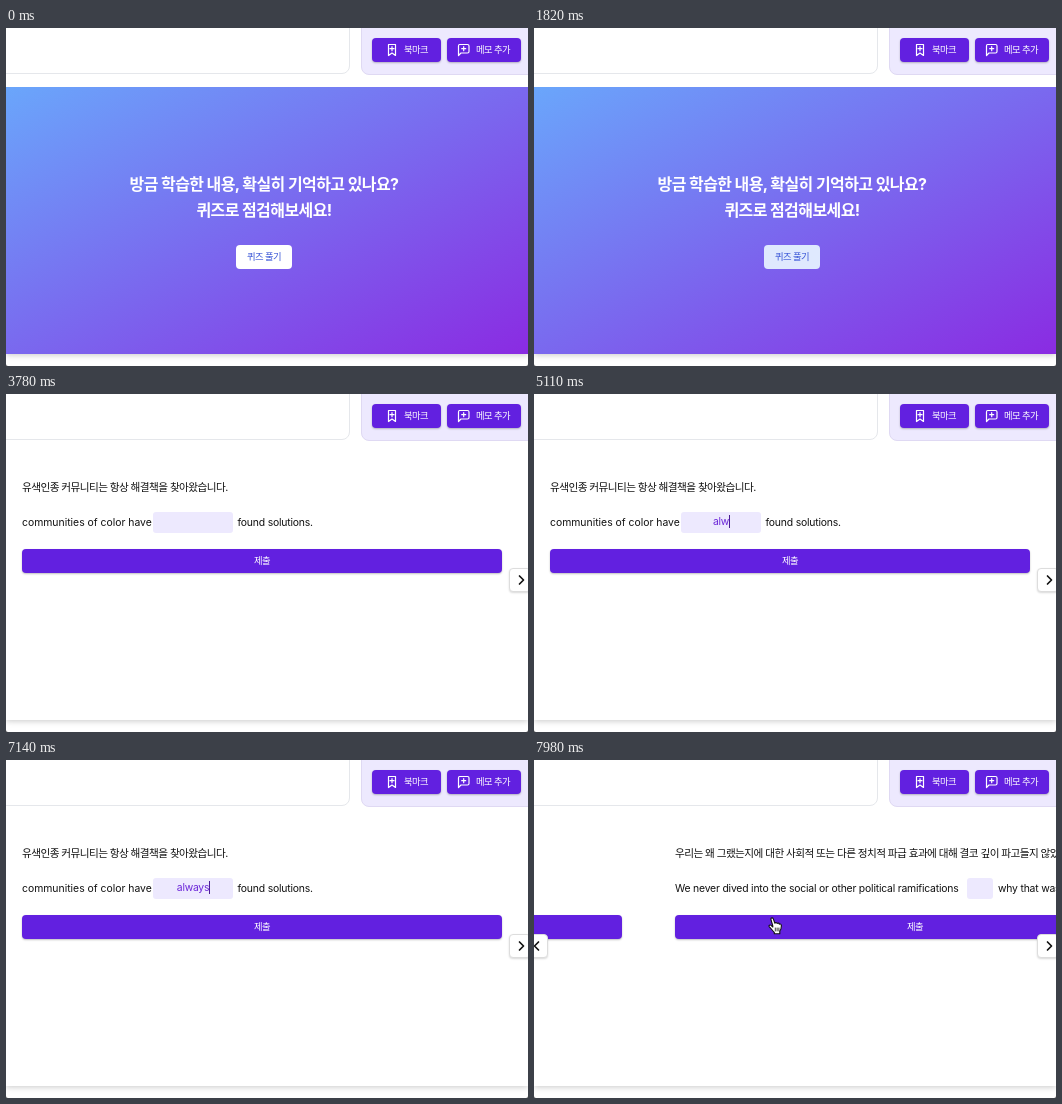
Recreate the animation shown at these times as an HTML page. Size 522 px wide and 338 px high, loop 8 s.

```html
<!DOCTYPE html>
<html lang="ko">
<head>
<meta charset="utf-8">
<title>Quiz</title>
<style>
  :root { --violet: #6220e0; --lilac: #ede9fe; }
  html, body { margin: 0; width: 100%; height: 100%; overflow: hidden; background: #555; }
  body {
    font: 10.67px/21px Inter, "Noto Sans CJK KR", "Noto Sans CJK", sans-serif;
    letter-spacing: -.055em; white-space: nowrap; color: #111;
  }
  body *, .answer::before { box-sizing: border-box; }
  svg { position: absolute; fill: none; overflow: visible; stroke-linecap: round; stroke-linejoin: round; }
  div, span { position: absolute; }

  .stage { left: 0; top: 0; width: 522px; height: 338px; overflow: hidden; background: #fff; border-radius: 0 0 2px 2px; }
  .card { left: 0; top: 0; width: 522px; height: 326px; background: #fff; box-shadow: 0 1px 6px rgba(0, 0, 0, .22); }
  .view { left: 0; top: 59px; width: 522px; height: 267px; overflow: hidden; }

  .panel { height: 60px; border: 1px solid #e5e7eb; border-radius: 8px; background: #fff; }
  .notes { left: -20px; top: -14px; width: 364px; }
  .tools { left: 355px; top: -13px; width: 190px; background: var(--lilac); border-color: #dfd9f3; }

  .btn {
    height: 24px; border-radius: 4px; background: var(--violet); color: #fff;
    font-size: 9.33px; font-weight: 500; line-height: 24px; text-align: center;
    box-shadow: 0 1px 2px rgba(0, 0, 0, .25);
  }
  .btn span { left: 32px; }
  .btn svg { left: 14px; top: 5px; stroke: #fff; stroke-width: 1.2; }

  .banner { inset: 0; background: linear-gradient(to bottom right, #6aa6fb, #8a2be2); }
  .banner p {
    position: absolute; left: 0; top: 84px; width: 516px; margin: 0;
    color: #fff; font-size: 16px; font-weight: 700; line-height: 26px; text-align: center;
  }
  .start { left: 230px; top: 158px; width: 56px; background: #fff; color: #3653d6; box-shadow: none; }

  .track { inset: 0; }
  .slide { left: 16px; top: 0; width: 480px; height: 267px; }
  .next { left: 549px; }
  .ko { left: 0; top: 24px; }
  .en { top: 59px; font-size: 10.4px; letter-spacing: -.2px; }
  .blank { top: 59px; height: 21px; border-radius: 3px; background: var(--lilac); }
  .submit { left: 0; top: 96px; width: 480px; }

  .answer {
    left: 131px; width: 80px; color: #6d28d9; font-size: 10.4px;
    line-height: 20px; letter-spacing: -.25px; text-align: center;
  }
  .answer::before { content: ""; }
  .caret { position: relative; display: inline-block; width: 1px; height: 13px; margin-right: -1px; vertical-align: -3px; background: #4c1d95; }
  .result { left: 0; top: 128px; color: #43a047; font-weight: 700; }
  .result span { left: 19px; }
  .result svg { left: 0; top: 3px; stroke: #43a047; stroke-width: 1.4; }

  .nav { top: 174px; width: 22px; height: 24px; border: 1px solid #ddd; border-radius: 4px; background: #fff; box-shadow: 0 1px 2px rgba(0, 0, 0, .15); }
  .nav svg { top: 6px; stroke: #111; stroke-width: 1.7; }
  .fwd { left: 503px; }
  .fwd svg { left: 9px; }
  .back { left: -8px; }
  .back svg { left: 7px; }
  .ibeam { left: 190px; top: 116px; stroke: #111; }
  .hand { left: 234px; top: 157px; fill: #fff; stroke: #111; stroke-width: 1.1; }

  /* every change is a hard cut on one 8 s clock */
  .start, .banner, .track, .caret, .result, .back, .ibeam, .hand, .answer::before { animation: 8s step-end infinite; }
  .start { animation-name: hover; }
  .banner { animation-name: leave; }
  .track { animation-name: scroll; }
  .answer::before { animation-name: type; }
  .caret { animation-name: blink; }
  .result { animation-name: correct; }
  .back { animation-name: reveal; }
  .ibeam { animation-name: aim; }
  .hand { animation-name: press; }

  @keyframes hover {
    0% { background: #fff; }
    21% { background: #f4f8ff; }
    21.875% { background: #e9f0fe; }
    22.75%, 100% { background: #dfe9fe; }
  }
  @keyframes leave { 0% { visibility: visible; } 27.125%, 100% { visibility: hidden; } }
  @keyframes scroll {
    0% { transform: none; }
    98% { transform: translateX(-11px); }
    98.875% { transform: translateX(-175px); }
    99.75%, 100% { transform: translateX(-408px); }
  }
  @keyframes type {
    0% { content: ""; }
    49% { content: "ㅁ"; }
    56% { content: ""; }
    61.25% { content: "a"; }
    62.125% { content: "al"; }
    63.875% { content: "alw"; }
    69.125% { content: "alwa"; }
    72.625% { content: "alway"; }
    76.125%, 100% { content: "always"; }
  }
  @keyframes blink {
    0% { opacity: 0; top: 1px; }
    36.75% { opacity: 1; top: 1px; }
    42.875% { opacity: 0; top: 1px; }
    49% { opacity: 1; top: 0; }
    56% { opacity: 1; top: 1px; }
    61.25% { opacity: 1; top: 0; }
    82.25% { opacity: 0; top: 0; }
    89.25% { opacity: 1; top: 0; }
    90.125%, 100% { opacity: 0; top: 0; }
  }
  @keyframes correct { 0% { opacity: 0; } 90.125% { opacity: .5; } 91%, 100% { opacity: 1; } }
  @keyframes reveal { 0% { opacity: 0; } 98%, 100% { opacity: 1; } }
  @keyframes aim { 0% { opacity: 0; } 36.75% { opacity: 1; } 47.25%, 100% { opacity: 0; } }
  @keyframes press {
    0% { opacity: 0; transform: translateX(3px); }
    90.125% { opacity: 1; transform: translateX(3px); }
    95.375%, 100% { opacity: 1; transform: none; }
  }
</style>
</head>
<body>
<div class="stage">
  <div class="card"></div>
  <div class="panel notes"></div>
  <div class="panel tools"></div>
  <div class="btn" style="left:366px;top:10px;width:69px">
    <svg width="12" height="14"><path d="M2.5 1.5h7v11L6 10l-3.500 2.500zM6 3.700v4M4 5.700h4"/></svg>
    <span>북마크</span>
  </div>
  <div class="btn" style="left:441px;top:10px;width:74px">
    <svg style="left:10px" width="14" height="14"><path d="M2.500 1.500h8q1.500 0 1.500 1.500v5.500q0 1.500-1.500 1.500H4l-2.500 2.500V3q0-1.500 1-1.500zM6.700 3.700v4M4.700 5.700h4"/></svg>
    <span style="left:29px">메모 추가</span>
  </div>

  <div class="view">
    <div class="track">
      <div class="slide">
        <span class="ko">유색인종 커뮤니티는 항상 해결책을 찾아왔습니다.</span>
        <span class="en" style="left:0;letter-spacing:0">communities of color have</span>
        <div class="blank answer"><i class="caret"></i></div>
        <span class="en" style="left:215.5px">found solutions.</span>
        <div class="btn submit">제출</div>
        <div class="result">
          <svg width="16" height="16"><circle cx="8" cy="8" r="6.800"/><path d="M5 8.200l2.200 2.200 3.900-4.200"/></svg>
          <span>정답입니다!</span>
        </div>
      </div>
      <div class="slide next">
        <span class="ko">우리는 왜 그랬는지에 대한 사회적 또는 다른 정치적 파급 효과에 대해 결코 깊이 파고들지 않았습니다.</span>
        <span class="en" style="left:0">We never dived into the social or other political ramifications</span>
        <div class="blank" style="left:292px;width:26px"></div>
        <span class="en" style="left:323px">why that was.</span>
        <div class="btn submit">제출</div>
      </div>
    </div>
    <div class="banner">
      <p>방금 학습한 내용, 확실히 기억하고 있나요?<br>퀴즈로 점검해보세요!</p>
      <div class="btn start">퀴즈 풀기</div>
    </div>
  </div>

  <div class="nav fwd" id="fwd"><svg width="6" height="10"><path d="M.5 1l4 4-4 4"/></svg></div>
  <div class="nav back"><svg width="6" height="10"><path d="M4.500 1l-4 4 4 4"/></svg></div>
  <svg class="ibeam" width="9" height="17"><path d="M2 1q2.500 0 2.500 2v11q0 2-2.500 2M7 1q-2.500 0-2.500 2v11q0 2 2.500 2M3 9h3"/></svg>
  <svg class="hand" width="15" height="18">
    <path d="M4.800 8.800L3 2.600C2.500.7 4.700.2 5.300 1.900L6.900 6.300C7.200 5.200 8.900 5.300 9.200 6.500 9.800 5.700 11.100 6 11.300 7.200 12.200 6.600 13.300 7.200 13.300 8.400 13.500 11 13 12.600 11.800 14.200V16.800H6.300V15.400C4.600 13.600 3 11.400 1.300 9.800.4 8.500 2 7.500 3.100 8.400L4.800 10z"/>
    <path d="M7.300 11v3M9.100 11v3M10.900 11v3" stroke-width=".8"/>
  </svg>
</div>
<script>
  // the banner covers the pager until the quiz opens
  const fwd = document.getElementById("fwd");
  fwd.style.animation = "reveal-fwd 8s step-end infinite";
  document.styleSheets[0].insertRule("@keyframes reveal-fwd { 0% { opacity: 0 } 27.125%, 100% { opacity: 1 } }");
</script>
</body>
</html>
```
